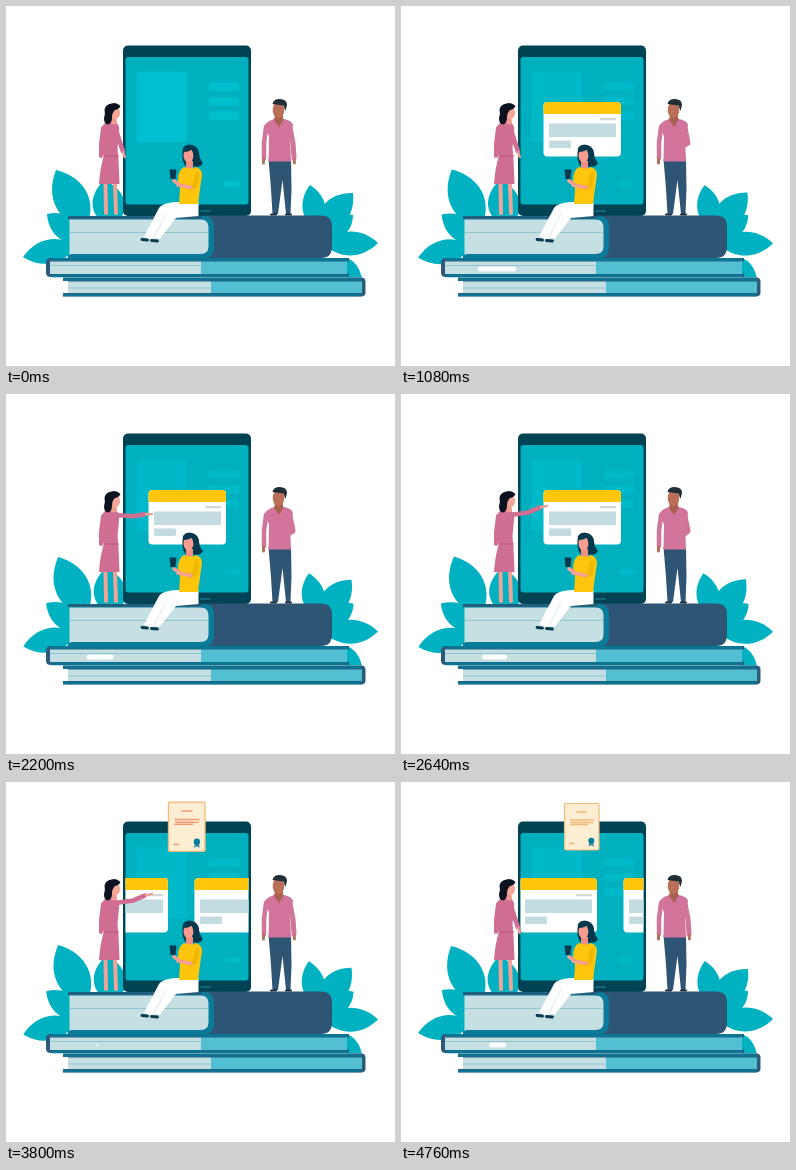
Animation of 389 by 360 pixels, one loop 4800 ms. Source, as an HTML page:

```html
<!DOCTYPE html>
<html lang="en">
<head>
<meta charset="utf-8">
<title>Online learning</title>
<style>
html, body { margin: 0; width: 100%; height: 100%; overflow: hidden; background: #fff; }
svg { display: block; }
.limb { fill: none; stroke-linecap: round; stroke-linejoin: round; }
</style>
</head>
<body>
<svg width="389" height="360" viewBox="0 0 389 360">
  <defs>
    <clipPath id="screen"><rect x="119.5" y="51" width="123" height="147.5" rx="3"/></clipPath>
    <g id="card">
      <rect x="142.5" y="96" width="77.5" height="54.5" rx="4" fill="#fff"/>
      <path d="M142.5 108V100q0-4 4-4h69.500q4 0 4 4v8z" fill="#ffc60a"/>
      <g class="lines" fill="#c2dce1">
        <path d="M199 112h16v2.200h-16z" fill="#d0dadd"/>
        <path d="M148 117.500h67v13.500h-67z"/>
        <rect x="148" y="134.500" width="22" height="7.500" rx="1"/>
      </g>
    </g>
  </defs>

  <g id="leaves" fill="#00b1c1"></g>

  <!-- Tablet -->
  <rect x="117" y="39.500" width="128" height="170.500" rx="5" fill="#004354"/>
  <rect x="119.500" y="51" width="123" height="147.500" rx="3" fill="#00b0be"/>
  <rect x="194" y="204" width="11" height="2" rx="1" fill="#12687b"/>
  <g id="blocks" fill="#00c0d0">
    <rect x="130.500" y="65.500" width="50.500" height="71" rx="3"/>
    <rect x="202.500" y="76.500" width="31" height="8.500" rx="4"/>
    <rect x="202.500" y="91" width="31" height="8.500" rx="4"/>
    <rect x="202.500" y="105.500" width="31" height="8.500" rx="4"/>
    <rect x="218" y="175" width="15.500" height="6" rx="3"/>
  </g>
  <g clip-path="url(#screen)">
    <use id="first" href="#card"/>
    <g id="following">
      <use href="#card" x="104"/>
      <use href="#card" x="208"/>
    </g>
  </g>
  <g id="certificate">
    <rect x="163.500" y="21.500" width="34.500" height="46.500" rx="1.500" fill="#fcedd3" stroke="#efba74" stroke-width="1.200"/>
    <path id="writing" d="M175.500 30h10.500M169 38h24M170 40.500h22M169 42.500h18M168 61.500h5.500" stroke-width="1.400"/>
    <path d="M188.500 60l-1 4.500 2.700-1.200 2.800 1.200-1-4.500z" fill="#3c8aa3"/>
    <circle cx="190.300" cy="58.800" r="3" fill="#007e9f"/>
  </g>

  <!-- Books -->
  <g id="books">
    <path d="M341 252q11 4 15 19.500h-15z" fill="#00b1c1"/>
    <path d="M57 271.500H355q4.500 0 4.500 4v11q0 4-4.500 4H57v-3.500h5v-12h-5z" fill="#2d5a7b"/>
    <path d="M62 275.500h143v11.500h-143z" fill="#c5dfe3"/>
    <path d="M205 275.500h151v11.500h-151z" fill="#52bfd3"/>
    <path d="M57 273.500h298M57 289h298" stroke="#0b7595" stroke-width="2.600"/>
    <path d="M62 282h143" stroke="#8ec6d0"/>
    <path d="M343 252H45q-5 0-5 4.500v10q0 4.500 5 4.500h298v-3.500h-3v-12h3z" fill="#2d5a7b"/>
    <path d="M44 255.500h151v12.500h-151z" fill="#c5dfe3"/>
    <path d="M195 255.500h146v12.500h-146z" fill="#52bfd3"/>
    <path d="M45 253.500h297M45 269.700h297" stroke="#0b7595" stroke-width="3"/>
    <path d="M44 259.500h151" stroke="#8ec6d0"/>
    <rect id="gap" y="260.500" height="5" rx="2.500" fill="#fff"/>
    <path d="M195 209.500h120q11 0 11 11v20q0 11.500-11 11.500H195z" fill="#2f5575"/>
    <path d="M62 210h136q10 0 10 10v22q0 10-10 10H62v-3.500h3v-35h-3z" fill="#0a7b99"/>
    <path d="M63.500 213.500h131q8 0 8 8v19q0 7.500-8 7.500H63.500z" fill="#c5dfe3"/>
    <path d="M62 211.500h134" stroke="#2f5575" stroke-width="2"/>
    <path d="M64 226.500h138" stroke="#8ec6d0"/>
  </g>

  <!-- Standing woman -->
  <g class="limb">
    <path d="M99.500 178l.500 29M109 178l1 29" stroke="#f2a397" stroke-width="4"/>
    <path d="M97 122l-2 16 0 12" stroke="#cf6d93" stroke-width="4"/>
  </g>
  <path d="M99 117q6-1 11 0 4 2 3 9l-1.500 16 1 12 1 24H93q1-15 4.500-27l-2-15q-1-16 3.500-19z" fill="#cf6d93"/>
  <path d="M98 150h15" stroke="#b9587f"/>
  <path d="M104.500 109h5.500l1 8q-3 3-6 0z" fill="#ee9b8e"/>
  <ellipse cx="109.500" cy="107" rx="4.600" ry="6" fill="#f4a799"/>
  <path d="M114.500 100q-4-4-9-2.500-6 1-7 6 1 4-.500 8.500 0 6 4 6.500 4-1 4-7 0-5 3-7.500 4-.500 5.500-4z" fill="#0d1220"/>
  <path id="sleeve" class="limb" stroke="#cf6d93" stroke-width="4.600"/>
  <path id="hand" class="limb" stroke="#f0a093" stroke-width="2.400"/>

  <!-- Man -->
  <path d="M262.500 153h22.500l.500 30-1 25h-4.500l-3.500-34-4.500 34h-5.500l-1.500-25z" fill="#2f5575"/>
  <path d="M265 208.500h5M280 208.500h5" class="limb" stroke="#1d3044" stroke-width="2"/>
  <path d="M260 121l-2 16 0 15" class="limb" stroke="#cf759a" stroke-width="4.500"/>
  <path d="M257.500 153v4" class="limb" stroke="#b5705c" stroke-width="3"/>
  <path id="manSleeve" class="limb" stroke="#cf759a" stroke-width="5"/>
  <path id="manHand" class="limb" stroke="#b5705c" stroke-width="3"/>
  <path d="M268 113h10q8 1.500 9 6l-3 12 1 24.500h-22.500l.500-25-4.500-10q1-5 9.500-7.500z" fill="#d2749b"/>
  <path d="M269 108h7.500l1 6-4.500 7-5-7z" fill="#a9624f"/>
  <ellipse cx="272.500" cy="104" rx="5.800" ry="8" fill="#bb6f58"/>
  <path d="M266.500 98q1-5 7-5 7.500 0 7.500 6l-1.500 6-2-5.500q-5-1-11-1.500z" fill="#1f2f36"/>

  <!-- Seated woman -->
  <path d="M192.500 196H170q-14 1-17 6l-15 28.500 6 3 5-1.500 5 .500L170 212l22.500-2z" fill="#fff"/>
  <path d="M160 208l-12 23" stroke="#d5e2e6" stroke-width=".8"/>
  <path d="M136 233.500l5.500.500M145.500 234.500l6 .500" class="limb" stroke="#073b50" stroke-width="2.800"/>
  <path d="M177 142q3-4.500 9-3 7 2 7 9 1 6 4 9-3 5-9 3.500l-9-1q-4-6-2-17.500z" fill="#04384c"/>
  <path d="M180 155h7v8h-7z" fill="#ee8f83"/>
  <path d="M178 161q7 3 12 0 6 2 6 8l-2 14-2 15h-19l1-15-2-8q0-11 6-14z" fill="#fdc50b"/>
  <ellipse cx="182.500" cy="149.500" rx="5" ry="7" fill="#f69c8f"/>
  <path d="M177 146q7 0 9-3l3 12q5-2 4-8l-5-7q-10-4-11 6z" fill="#04384c"/>
  <g class="limb">
    <path d="M191 169l-2 11-5 2" stroke="#f2b800" stroke-width="5"/>
    <path d="M185 181.500l-13-2.500M173 178l-5-3" stroke="#f4a094" stroke-width="3.600"/>
  </g>
  <path d="M163.500 163.500h7l-1 9.500h-5z" fill="#06394d"/>
</svg>
<script>
const LOOP = 4800, STEP = 40;
const $ = id => document.getElementById(id);
const put = (id, name, value) => $(id).setAttribute(name, value);
const clamp = x => Math.min(1, Math.max(0, x));
const mix = (a, b, u) => a + (b - a) * u;
const ease = (t, from, to) => (1 - Math.cos(Math.PI * clamp((t - from) / (to - from)))) / 2;

function pop(t, from, to) {
  const u = clamp((t - from) / (to - from)) - 1;
  return 1 + 2.4 * u ** 3 + 1.4 * u ** 2;
}

// Linear interpolation through [time, value] pairs.
function track(t, keys) {
  const i = Math.max(1, keys.findIndex(k => k[0] >= t));
  const [t0, a] = keys[i - 1], [t1, b] = keys[i];
  return mix(a, b, clamp((t - t0) / (t1 - t0)));
}

// base x, base y, tip x, tip y, half width, sway in degrees
const leaves = [
  [80, 222, 50, 164, 17, 8.6], [78, 236, 41, 208, 12, -7],
  [70, 240, 17, 251, 12, -6], [107, 222, 98, 174, 16, 11],
  [312, 225, 304, 179, 11.5, -6], [312, 225, 347, 187, 13.5, -9],
  [318, 232, 347, 209, 10, 5], [318, 238, 372, 237, 12, 2]
].map(([x, y, tipX, tipY, w, sway]) => {
  const node = document.createElementNS("http://www.w3.org/2000/svg", "path");
  const len = Math.hypot(tipX - x, tipY - y);
  const angle = Math.atan2(tipX - x, y - tipY) * 180 / Math.PI;
  const c = w * 1.33;
  node.setAttribute("d", `M0 0C${-c} ${-len * .27} ${-c} ${-len * .7} 0 ${-len}C${c} ${-len * .7} ${c} ${-len * .27} 0 0Z`);
  $("leaves").append(node);
  return { node, x, y, angle, sway };
});

const scaleAt = (x, y, s) => `translate(${x} ${y}) scale(${s}) translate(${-x} ${-y})`;
const show = (id, on) => put(id, "visibility", on ? "visible" : "hidden");

function drawCards(t) {
  const shift = track(t, [[3040, 0], [3320, 21.5], [4240, 91.5], [4760, 128], [4800, 131]]);
  const size = pop(t, 400, 900);
  show("first", t > 400);
  show("following", t > 3040);
  put("first", "transform", `translate(${-shift} 0) ${scaleAt(181.5, 123, size)}`);
  put("following", "transform", `translate(${-shift} 0)`);
  const skew = -22 * ease(t, 3040, 3280) * (1 - ease(t, 3360, 3800));
  document.querySelector(".lines").setAttribute("transform",
    `translate(181.5 124) skewX(${skew}) translate(-181.5 -124)`);
  put("blocks", "opacity", mix(1, .6, ease(t, 0, 900)));
}

function drawCertificate(t) {
  show("certificate", t > 3480);
  put("certificate", "transform", scaleAt(180.7, 44.7, pop(t, 3480, 4080)));
  put("writing", "stroke", `hsl(${mix(18, 34, ease(t, 4240, 4760))} 78% 70%)`);
}

function drawWomanArm(t) {
  const u = ease(t, 1360, 2480) * (1 - ease(t, 3840, 4760));
  const angle = mix(72, -14, u) * Math.PI / 180, reach = mix(31.6, 38, u);
  const at = (k, drop = 0) =>
    `${109 + Math.cos(angle) * reach * k} ${121 + Math.sin(angle) * reach * k + drop}`;
  put("sleeve", "d", `M${at(0)}L${at(.5, 2 * u)} ${at(.8)}`);
  put("hand", "d", `M${at(.84)}L${at(1)}`);
}

// The forearm folds away behind the back.
function drawManArm(t) {
  const u = ease(t, 400, 1000) * (1 - ease(t, 2480, 3080));
  const angle = mix(86, 150, u) * Math.PI / 180;
  const at = r => `${287 + Math.cos(angle) * r} ${137 + Math.sin(angle) * r}`;
  put("manSleeve", "d", `M283.5 119L${at(0)} ${at(15)}`);
  put("manHand", "d", `M${at(17)}L${at(20)}`);
}

function drawGap(t) {
  const times = [0, 1080, 1800, 2640, 3320, 4240, 4760, 4800];
  const edge = xs => track(t, times.map((time, i) => [time, xs[i]]));
  const left = edge([95, 77, 80, 81, 95, 87, 88, 88]);
  const right = edge([95, 115, 109, 106, 95, 89, 105, 105]);
  put("gap", "x", left);
  put("gap", "width", right - left);
}

function draw() {
  const t = Math.floor(performance.now() % LOOP / STEP) * STEP;
  const wave = (1 - Math.cos(t / 1200 * 2 * Math.PI)) / 2;
  for (const { node, x, y, angle, sway } of leaves)
    node.setAttribute("transform", `translate(${x} ${y}) rotate(${angle + sway * wave})`);
  drawCards(t);
  drawCertificate(t);
  drawWomanArm(t);
  drawManArm(t);
  drawGap(t);
  requestAnimationFrame(draw);
}
draw();
</script>
</body>
</html>
```
